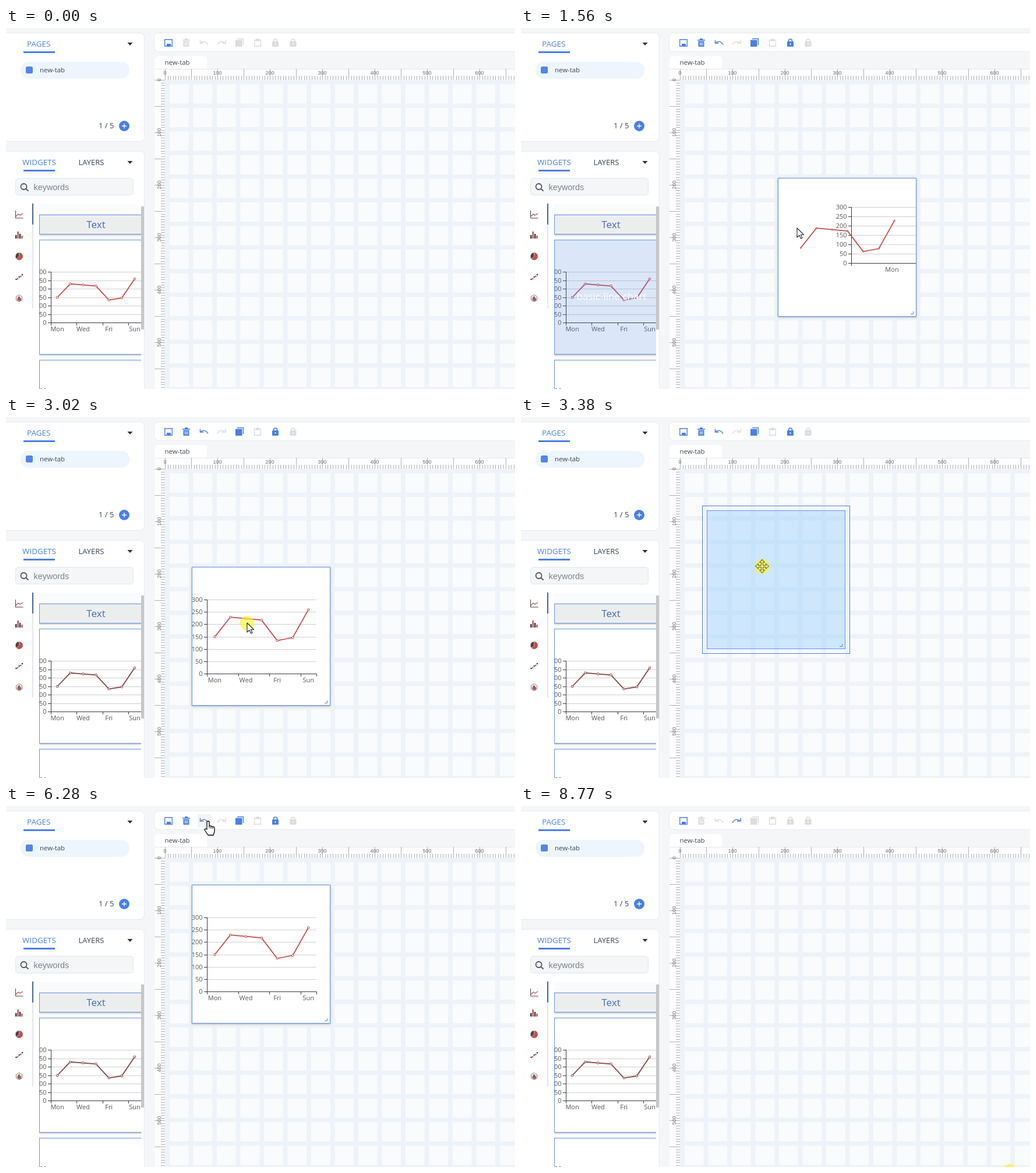
An HTML page with a canvas that plays this animation: 874x619 px, repeating every 8.84 s.

```html
<!DOCTYPE html>
<html lang="en">
<head>
<meta charset="utf-8">
<title>Widget editor</title>
<style>
  html, body { margin: 0; width: 100%; height: 100%; overflow: hidden; }
  canvas { display: block; }
</style>
</head>
<body>
<canvas id="stage" width="874" height="619"></canvas>
<script>
const c = document.getElementById('stage').getContext('2d');
const LOOP = 8840, SIZE = 238;
const BLUE = '#4a80e2', EDGE = '#6594e6', OFF = '#dcdcdc', DARK = '#333a44', RED = '#c24f4b';
const DAYS = ['Mon', '', 'Wed', '', 'Fri', '', 'Sun'];
const SALES = [150, 230, 224, 218, 135, 147, 260];

// Pointer moves: start, end, x, y
const ENTRY = [808, 576];
const MOVES = [
  [130, 500, 200, 67], [500, 900, 90, 449], [1020, 1430, 474, 343], [1600, 1850, 516, 343],
  [1910, 2440, 636, 342], [2500, 2850, 414, 353], [3090, 3500, 414, 231], [3650, 4250, 337, 27],
  [5070, 5400, 370, 27], [5980, 6280, 347, 26], [8010, 8570, 839, 626]];

// Widget places after each edit, and when edits are made, undone and redone
const PLACES = [null, [441, 257], [561, 257], [319, 257], [319, 135]];
const GRABS = [1020, 1910, 2500, 3090];
const DROPS = [1430, 2500, 2880, 3580];
const UNDOS = [4400, 4800, 6750, 6950, 7210, 7610];
const REDOS = [5550, 5950];
const PRESS = 130;

const within = (t, a, b) => t >= a && t < b;
const mix = (a, b, p) => a + (b - a) * p;
const unit = v => Math.min(1, Math.max(0, v));
const ease = p => p * p * (3 - 2 * p);
const past = (times, t) => times.filter(at => t >= at).length;

function pointerAt(t) {
  let [x, y] = ENTRY;
  for (const [start, end, toX, toY] of MOVES) {
    const p = ease(unit((t - start) / (end - start)));
    x = mix(x, toX, p);
    y = mix(y, toY, p);
  }
  return [x, y];
}

function sceneAt(t) {
  const made = past(DROPS, t);
  const step = made + past(REDOS, t) - past(UNDOS, t);
  const drag = GRABS.findIndex((grab, i) => within(t, grab, DROPS[i]));
  const [x, y] = pointerAt(t);
  let place = PLACES[step];
  if (drag > 0) {
    const [fromX, fromY] = pointerAt(GRABS[drag]);
    place = [place[0] + x - fromX, place[1] + y - fromY];
  }
  return {
    t, x, y, step, place, dragging: drag > 0, fromTray: drag === 0,
    canRedo: step < made,
    selected: step > (t < UNDOS[0] ? 0 : 1),
    overTools: y < 40,
    pressed: GRABS.some((grab, i) => within(t, grab - PRESS, DROPS[i])) ||
      [...UNDOS, ...REDOS, LOOP + 60].some(click => within(t, click - PRESS, click)),
  };
}

function rect(x, y, w, h, fill) {
  c.fillStyle = fill;
  c.fillRect(x, y, w, h);
}
function round(x, y, w, h, r, fill, stroke) {
  c.beginPath();
  c.roundRect(x, y, w, h, r);
  c.fillStyle = fill;
  c.fill();
  if (stroke) { c.strokeStyle = stroke; c.lineWidth = 1; c.stroke(); }
}
function frame(x, y, w, h, color) {
  c.strokeStyle = color;
  c.lineWidth = 1;
  c.strokeRect(x + .5, y + .5, w - 1, h - 1);
}
function disc(x, y, r, fill) {
  c.beginPath();
  c.arc(x, y, r, 0, 7);
  c.fillStyle = fill;
  c.fill();
}
function path(d, stroke, width = 1, fill) {
  const p = new Path2D(d);
  if (fill) { c.fillStyle = fill; c.fill(p); }
  if (stroke) { c.strokeStyle = stroke; c.lineWidth = width; c.stroke(p); }
}
function text(s, x, y, size, color, align = 'left', family = 'Open Sans') {
  c.font = `${size}px "${family}", sans-serif`;
  c.fillStyle = color;
  c.textAlign = align;
  c.fillText(s, x, y);
}
function local(x, y, draw) {
  c.save();
  c.translate(x, y);
  draw();
  c.restore();
}
function clip(x, y, w, h) {
  c.beginPath();
  c.rect(x, y, w, h);
  c.clip();
}
function shadowed(x, y, w, h, fill) {
  c.save();
  c.shadowColor = 'rgba(0,0,0,.3)';
  c.shadowBlur = 3;
  c.shadowOffsetY = 1;
  rect(x, y, w, h, fill);
  c.restore();
}

function axes(x, top, bottom, step) {
  const right = x + step * 7;
  for (let i = 0; i <= 6; i++) {
    const y = Math.round(mix(bottom, top, i / 6));
    rect(x, y, right - x, 1, i ? '#cfcfcf' : DARK);
    rect(x - 5, y, 5, 1, DARK);
    text(i * 50, x - 7.5, y + 3.5, 11, '#555', 'right');
  }
  rect(x, top, 1, bottom - top, DARK);
  DAYS.forEach((day, i) => {
    if (i % 2 === 0) rect(Math.round(x + step * i), bottom, 1, 5, DARK);
    text(day, x + step * (i + .5), bottom + 15, 11, '#555', 'center');
  });
  rect(Math.round(right), bottom, 1, 5, DARK);
}
function series(x, top, bottom, step, color, radius = 2.2) {
  const points = SALES.map((v, i) => [x + step * (i + .5), mix(bottom, top, v / 300) + .5]);
  path('M' + points.join('L'), color, 1.8);
  for (const [px, py] of points) {
    disc(px, py, radius, color);
    disc(px, py, radius - 1, '#fff');
  }
}

function trayCard(x, y, hover, color) {
  local(x, y, () => {
    clip(0, 0, 175, 200);
    shadowed(0, 0, 190, 197, '#fff');
    axes(20, 55, 142, 22.15);
    series(20, 55, 142, 22.15, color);
    if (hover) {
      rect(0, 0, 190, 197, 'rgba(74,128,220,.2)');
      text('basic-line chart', 98.5, 103, 17, '#fff', 'center');
    }
    frame(0, 0, 190, 197, EDGE);
  });
}

function panels() {
  rect(0, 0, 874, 619, '#f5f6f8');
  round(-10.5, 8.5, 248, 186, 8, '#fff', '#e7eaee');
  round(-10.5, 211.5, 248, 440, 8, '#fff', '#e7eaee');
  round(254.5, 8.5, 640, 32, 8, '#fff', '#e7eaee');

  text('PAGES', 36, 32, 13.5, BLUE);
  rect(30, 40, 54, 3, BLUE);
  round(25, 58, 187, 29, 14, '#edf6ff');
  round(34, 66, 12, 12, 2.5, '#5586e6');
  text('new-tab', 58, 76, 11.4, '#3a4350');
  text('1 / 5', 159, 172, 13, '#3a4350');
  disc(203, 168, 9, BLUE);
  path('M199 168h8M203 164v8', '#fff', 1.3);

  text('WIDGETS', 28, 235, 13.4, BLUE);
  rect(30, 243, 54, 3, BLUE);
  text('LAYERS', 124.5, 235, 13, '#3a4350');
  for (const y of [25, 228]) path(`M208.5 ${y}h9l-4.5 5z`, 0, 0, '#2c3440');
  round(16.5, 257.5, 202, 29, 5, '#f4f6f7', '#e3e7ea');
  path('M35.5 272a5 5 0 1 0 -10 0a5 5 0 1 0 10 0M34 275.5l4.5 4', '#4a525c', 1.8);
  text('keywords', 47.5, 278, 14.4, '#7d848b', 'left', 'Liberation Sans');
}

function categories() {
  rect(45, 301, 2, 180, '#e3e6eb');
  rect(45, 301, 2, 36, '#456592');
  path('M16.5 313v13h13', '#444');
  path('M17 323l4-4 3 2 5-3', RED, 1.3);
  [6, 12, 8, 5].forEach((h, i) => rect(16 + i * 3.4, 361 - h, 2.4, h, i % 2 ? RED : DARK));
  disc(22.5, 391.5, 6.5, RED);
  path('M22.5 391.5v-6.5a6.5 6.5 0 0 0-4.5 11z', '#fff', .6, '#444');
  for (let i = 0; i < 5; i++) disc(17.5 + i * 2.6, 431 - i * 2 + i % 2, 1.3, i % 2 ? RED : DARK);
  path('M22.5 457.5l5 3v6l-5 3l-5-3v-6z', '#777', 1, '#fff');
  path('M22.5 460l3 4 0 3-3 1-3-2 1-4z', '#555', .7, RED);
}

function tray({ t }) {
  const hover = within(t, 860, 1840);
  c.save();
  clip(57, 302, 175, 317);
  rect(57, 302, 175, 317, '#fafbfc');
  shadowed(57, 320, 190, 34, '#eceeee');
  frame(57, 320, 190, 34, EDGE);
  text('Text', 154.5, 343, 17, '#4467b8', 'center');
  trayCard(57, 363, hover, t < 1840 ? RED : '#874746');
  rect(57, 569, 190, 60, '#fff');
  frame(57, 569, 190, 60, EDGE);
  text('300', 70, 626, 11, '#555', 'right');
  c.restore();
  rect(232, 306, 5, 211, '#c6c6c6');
}

function board() {
  round(255, 48, 90, 30, [6, 6, 0, 0], '#fff');
  text('new-tab', 272.5, 63, 11.4, '#3a4350');
  rect(255, 70, 619, 549, '#fdfdfe');
  rect(273, 89, 601, 530, '#eef3fa');
  for (let x = 281; x < 874; x += 40.5)
    for (let y = 96.5; y < 619; y += 40.5) round(x, y, 32.6, 33, 1, '#fafbfd');

  rect(255, 70, 619, 1, '#e6e8ec');
  for (let i = 0; i < 134; i++) {
    const long = i % 10 === 0, d = Math.round(i * 4.5);
    rect(273 + d, long ? 70 : 82, 1, long ? 19 : 7, '#b0b0b0');
    rect(long ? 255 : 266, 89 + d, long ? 18 : 7, 1, '#b0b0b0');
  }
  for (let i = 0; i <= 6; i++) {
    text(i * 100, 273 + i * 90, 80, 9, '#707070', 'center', 'Liberation Sans');
    local(266, 89 + i * 90, () => {
      c.rotate(-Math.PI / 2);
      text(i * 100, 0, 0, 9, '#707070', 'center', 'Liberation Sans');
    });
  }
}

function lock(x, color) {
  path(`M${x - 3} 24v-2a3 3 0 0 1 6 0v2`, color, 1.7);
  round(x - 5.5, 23, 11, 9, 1, color);
  rect(x - .7, 26, 1.4, 3, '#fff');
}

function toolbar({ x, step, canRedo, selected, overTools }) {
  const tool = selected ? BLUE : OFF;
  const overUndo = overTools && within(x, 326, 354);
  if (overUndo) rect(329, 14, 23, 23, '#f1f3f6');
  if (overTools && within(x, 358, 384)) rect(359, 14, 23, 23, '#f1f3f6');

  path('M272.7 19.7h12.6v11.6h-12.6z', BLUE, 1.4);
  rect(276, 27, 7, 4, BLUE);

  rect(303, 20, 13, 1.6, tool);
  rect(307, 18, 5, 2, tool);
  rect(304.5, 22.5, 10, 9.5, tool);
  for (let i = 0; i < 3; i++) rect(307 + i * 2.2, 24.5, .9, 5.5, '#fff');

  path('M334.5 25q7-5 12.5 3.5M333.5 20.5v5.5h6', !step ? OFF : overUndo ? '#7388b8' : BLUE, 1.5);
  path('M375.5 25q-7-5-12.5 3.5M377 20.5v5.5h-6', canRedo ? BLUE : OFF, 1.5);

  path('M397 18.5h10.5v10.5', tool, 1.4);
  rect(394, 20.5, 11.5, 11.5, tool);

  path('M426.7 20.7h10.6v10.6h-10.6z', OFF, 1.4);
  rect(429, 18.5, 6, 4, OFF);
  lock(462.5, tool);
  lock(493, OFF);
}

function widget({ t, place, dragging }) {
  if (!place) return;
  local(...place.map(Math.round), () => {
    if (dragging) {
      rect(0, 0, SIZE, SIZE, 'rgba(144,202,249,.42)');
      frame(0, 0, SIZE, SIZE, EDGE);
      frame(-8, -8, SIZE + 16, SIZE + 16, BLUE);
    } else {
      shadowed(0, 0, SIZE, SIZE, '#fff');
      c.save();
      clip(1, 1, SIZE - 2, SIZE - 2);
      const p = unit((t - 1570) / 230);
      const settle = (a, b) => Math.round(mix(a, b, p));
      axes(settle(126, 26), settle(50, 56), settle(146, 183), mix(140, 26.8, p));
      series(26, 56, 183, 26.8, RED, mix(1.6, 2.2, p));
      c.restore();
      frame(0, 0, SIZE, SIZE, EDGE);
    }
    path('M228 233.5h4.5v-4.5', BLUE);
  });
}

function pointer({ t, x, y, pressed, dragging, overTools }) {
  if (t < 130) return;
  if (pressed) disc(x, y + .5, 12.5, 'rgba(255,240,40,.62)');
  if (t >= 8570) return;
  local(x, y, () => {
    c.lineJoin = 'round';
    if (dragging) {
      for (let i = 0; i < 4; i++) {
        path('M-1.5-1.5v-5h-3l4.5-5l4.5 5h-3v5', '#77772a', 1.1);
        c.rotate(Math.PI / 2);
      }
    } else if (overTools) {
      path('M-2 1q2-2 4 0v7q2-1 3 1q2-1 3 1q2-1 3 1v7l-2 6h-9l-6-9q0-3 4-1z', '#000', 1.3, '#fff');
      path('M2 8v4M5 9v4M8 10v3', '#000');
    } else {
      path('M0 0v16l4-3.5l2.5 5.5l2.5-1l-2.5-5.5h5z', '#222', 1.1, '#fff');
    }
  });
}

function draw(now) {
  const scene = sceneAt(now % LOOP);
  panels();
  categories();
  tray(scene);
  board();
  toolbar(scene);
  widget(scene);
  if (scene.fromTray) {
    c.globalAlpha = .5;
    trayCard(scene.x - 33, scene.y - 86, false, RED);
    c.globalAlpha = 1;
  }
  pointer(scene);
}

const start = performance.now();
function tick() {
  draw(performance.now() - start);
  requestAnimationFrame(tick);
}
tick();
</script>
</body>
</html>
```
